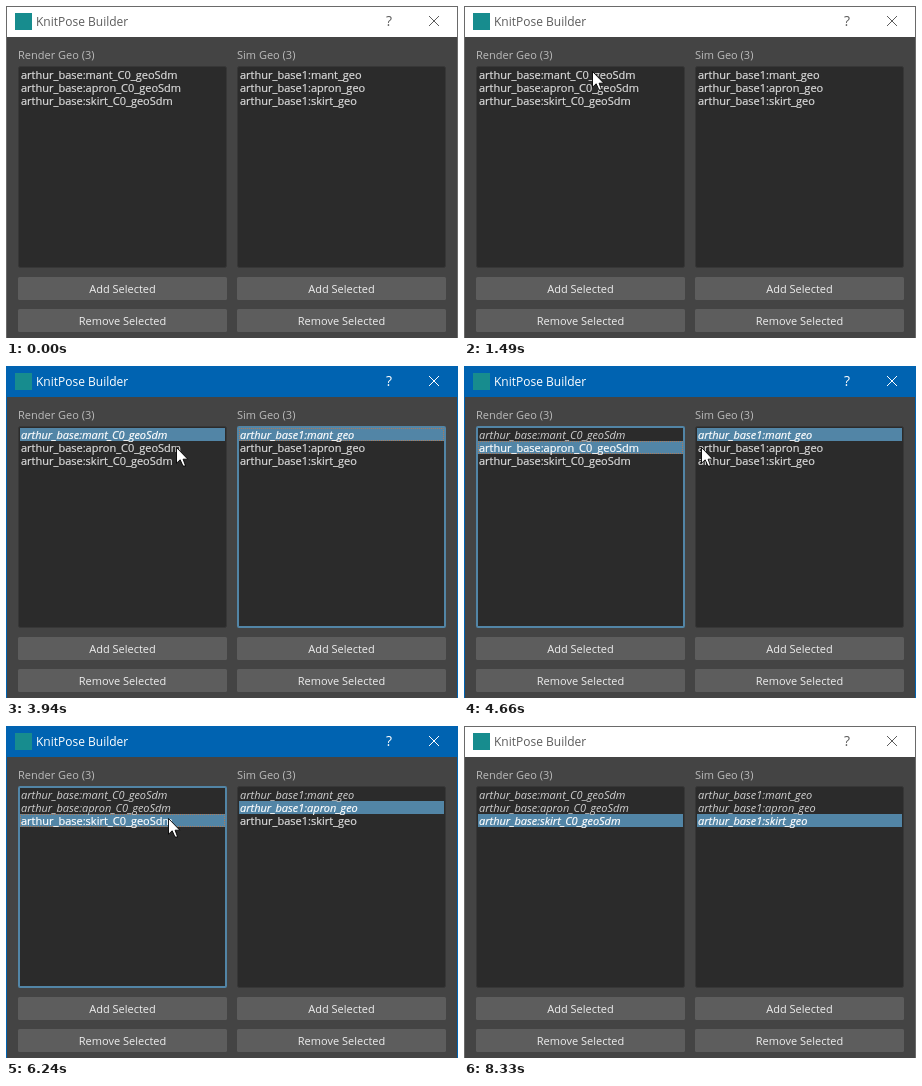
Animation of 452 by 332 pixels, one loop 8.41 s. Source, as an HTML page:

```html
<!DOCTYPE html>
<html lang="en">
<head>
<meta charset="utf-8">
<title>KnitPose Builder</title>
<style>
html, body { margin: 0; width: 100%; height: 100%; overflow: hidden; background: #444; }
svg { display: block; width: 452px; height: 332px; font: 11px "Open Sans", "Noto Sans", sans-serif; }
.bar { fill: #fff; }
.edge { fill: #6a6a6a; }
.caption { fill: #5c5c5c; font-size: 12px; }
.close { stroke: #5c5c5c; fill: none; }
.active .bar, .active .edge { fill: #0063b1; }
.active .caption { fill: #fff; }
.active .close { stroke: #fff; }
.label { fill: #bbb; }
.list { fill: #2b2b2b; stroke: #373737; }
.focus { fill: none; stroke: #5285a6; stroke-width: 2; }
.selection { fill: #5285a6; }
.current { fill: none; stroke: #ad7a59; stroke-dasharray: 1 1; stroke-dashoffset: .5; }
.row { fill: #dcdcdc; stroke: #dcdcdc; stroke-width: .2; }
.row.linked { fill: #d0d0d0; stroke: none; font-style: italic; }
.row.on { fill: #fff; stroke: #fff; }
.button rect { fill: #5d5d5d; }
.button.hover rect { fill: #707070; }
.button text { fill: #eee; text-anchor: middle; }
</style>
</head>
<body>
<svg id="stage" viewBox="0 0 452 332">
  <rect width="452" height="332" fill="#444"/>
  <rect class="bar" width="452" height="31"/>
  <rect class="edge" width="452" height="1"/>
  <rect class="edge" width="1" height="332"/>
  <rect class="edge" x="451" width="1" height="332"/>
  <rect x="9" y="7" width="17" height="17" fill="#178c8e"/>
  <text class="caption" x="30" y="20">KnitPose Builder</text>
  <text class="caption" x="380" y="20" style="font-size:14px">?</text>
  <path class="close" d="M423 10L433 20M433 10L423 20"/>
  <g id="panels"></g>
  <circle id="press" r="11.5" fill="#e4d8d2" opacity=".47"/>
  <path id="cursor" d="M.5 .5V16.2L4.2 12.8 7 19H9.6L7.1 12.2H11.8Z" fill="#fff" stroke="#000" stroke-width=".9"/>
</svg>
<script>
const LOOP = 8410, ACTIVATE = 2000, DEACTIVATE = 8330, ROW = 13;
const stage = document.getElementById("stage");
const panelRoot = document.getElementById("panels");
const cursor = document.getElementById("cursor");
const press = document.getElementById("press");

function add(parent, tag, attrs, text = "") {
  const node = document.createElementNS("http://www.w3.org/2000/svg", tag);
  for (const key in attrs) node.setAttribute(key, attrs[key]);
  node.textContent = text;
  return parent.appendChild(node);
}

const show = (node, visible) => { node.style.display = visible ? "" : "none"; };

function makePanel(x, title, prefix, suffix) {
  add(panelRoot, "text", { class: "label", x, y: 53 }, title);
  add(panelRoot, "rect", { class: "list", x: x + .5, y: 60.5, width: 208, height: 201, rx: 2 });
  const focus = add(panelRoot, "rect", { class: "focus", x: x + 1, y: 61, width: 207, height: 200, rx: 1 });
  const selection = add(panelRoot, "rect", { class: "selection", x: x + 2, width: 205, height: ROW });
  const current = add(panelRoot, "rect", { class: "current", x: x + 2.5, width: 204, height: ROW - 1 });
  const rows = ["mant", "apron", "skirt"].map((name, i) =>
    add(panelRoot, "text", { x: x + 3, y: 73 + i * ROW }, prefix + name + suffix));
  const buttons = ["Add Selected", "Remove Selected"].map((name, i) => {
    const y = 271 + i * 32;
    const node = add(panelRoot, "g", { class: "button" });
    add(node, "rect", { x, y, width: 209, height: 23, rx: 1.5 });
    add(node, "text", { x: x + 104.5, y: y + 16 }, name);
    return { node, x, y };
  });
  return { focus, selection, current, rows, buttons };
}

const panels = [
  makePanel(12, "Render Geo (3)", "arthur_base:", "_C0_geoSdm"),
  makePanel(231, "Sim Geo (3)", "arthur_base1:", "_geo")
];

// Each click picks a row; choosing one on the right links the pair on release.
const clicks = [
  { down: 2000, up: 2070, side: 0, row: 0 },
  { down: 3230, up: 3270, side: 1, row: 0 },
  { down: 4190, up: 4280, side: 0, row: 1 },
  { down: 5020, up: 5100, side: 1, row: 1 },
  { down: 5910, up: 6000, side: 0, row: 2 },
  { down: 7110, up: 7200, side: 1, row: 2 }
];

// Pointer strokes: quadratic curves, sampled in a given number of steps.
const move = (start, end, steps, from, bend, to, power = 1.7) =>
  ({ start, end, steps, from, bend, to, power });
const moves = [
  move(440, 1280, 20, [330, 332], [55, 70], [122, 61]),
  move(1310, 1490, 5, [122, 61], [125, 63], [128, 65]),
  move(2450, 3040, 14, [128, 65], [211, 56], [278, 73]),
  move(3470, 3940, 12, [278, 73], [224, 80], [170, 80.5]),
  move(4500, 4800, 8, [170, 80.5], [212, 80], [253, 81]),
  move(5280, 5700, 11, [253, 81], [228, 96], [149, 92]),
  move(6240, 6780, 12, [149, 92], [198, 94], [247, 93]),
  move(7650, 7870, 6, [247, 93], [270, 215], [300, 345], 1)
];

function pointerAt(t) {
  const m = moves.filter(item => t >= item.start).pop();
  if (!m) return null;
  const step = Math.floor((t - m.start) / (m.end - m.start) * (m.steps - 1) + .3);
  const progress = Math.min(1, (step + 1) / m.steps);
  const s = 1 - (1 - progress) ** m.power;
  return [0, 1].map(i => Math.round(
    (1 - s) ** 2 * m.from[i] + 2 * s * (1 - s) * m.bend[i] + s * s * m.to[i]));
}

function draw(t) {
  const active = t >= ACTIVATE && t < DEACTIVATE;
  const done = clicks.filter(c => t >= c.down);
  const last = done[done.length - 1];
  const pointer = pointerAt(t);
  stage.classList.toggle("active", active);

  panels.forEach((panel, side) => {
    const picked = done.filter(c => c.side === side).pop();
    const focused = active && last.side === side;
    show(panel.focus, focused);
    show(panel.selection, picked);
    show(panel.current, focused);
    if (picked) {
      panel.selection.setAttribute("y", 62 + picked.row * ROW);
      panel.current.setAttribute("y", 62.5 + picked.row * ROW);
    }
    panel.rows.forEach((node, row) => {
      const linked = clicks.some(c => c.side === 1 && c.row === row && t >= c.up);
      const on = picked && picked.row === row;
      node.setAttribute("class", "row" + (on ? " on" : "") + (linked ? " linked" : ""));
    });
    panel.buttons.forEach(({ node, x, y }) => {
      const over = pointer && pointer[0] >= x && pointer[0] < x + 209
        && pointer[1] >= y && pointer[1] < y + 23;
      node.classList.toggle("hover", !!over);
    });
  });

  show(cursor, pointer);
  show(press, last && t < last.up);
  if (pointer) {
    const place = `translate(${pointer})`;
    cursor.setAttribute("transform", place);
    press.setAttribute("transform", place);
  }
}

const began = performance.now();
function tick() {
  draw((performance.now() - began) % LOOP);
  requestAnimationFrame(tick);
}
tick();
</script>
</body>
</html>
```
